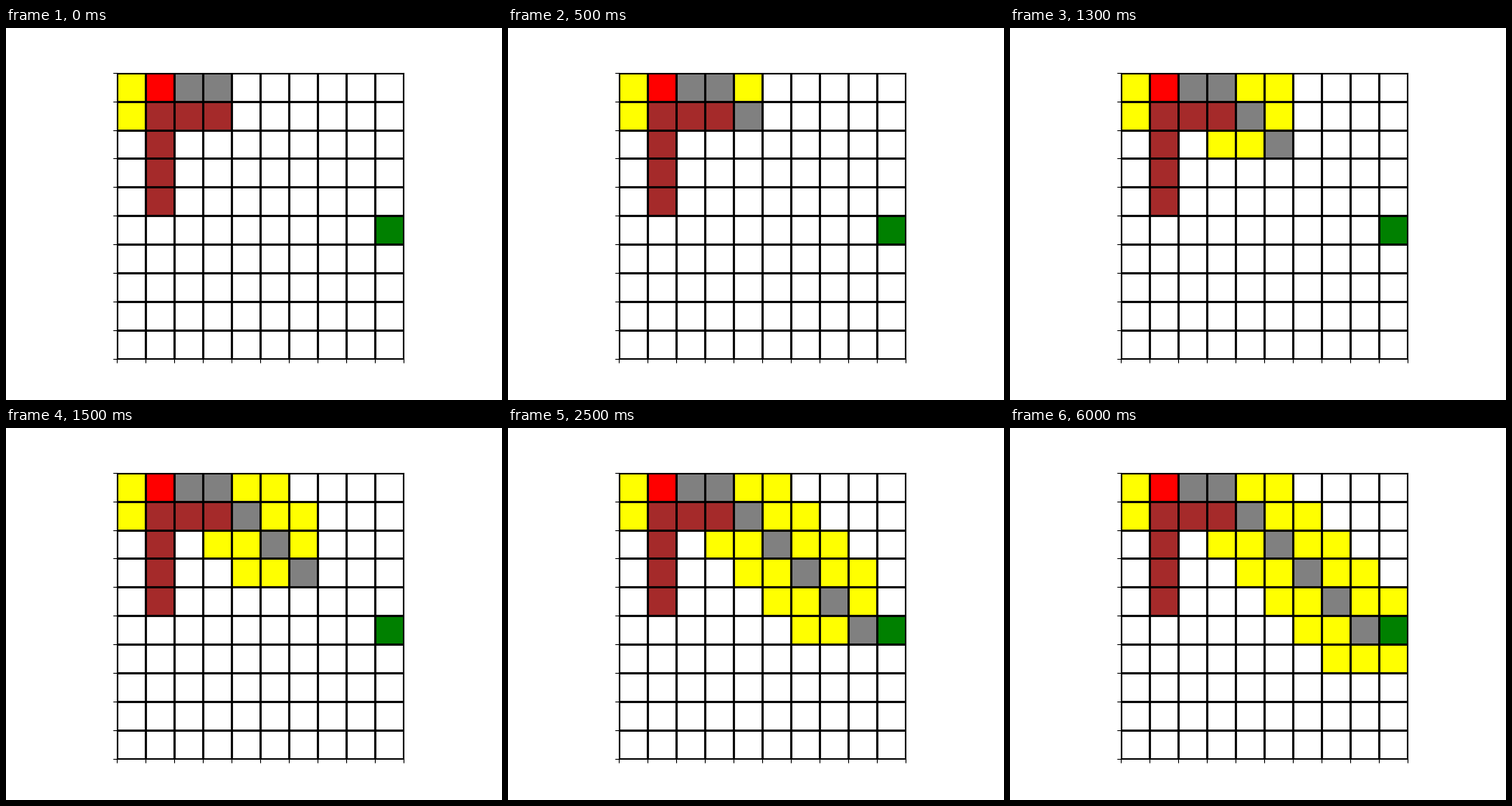
Animation of 640 by 480 pixels, one loop 8000 ms. Source, as a matplotlib script:

```python
import itertools
import math

import matplotlib.pyplot as plt
import numpy as np
from matplotlib.animation import FuncAnimation
from matplotlib.colors import ListedColormap

SIZE = 10
STEP_MS = 500
FRAMES = 16
EMPTY, WALL, SEEN, PATH, START, GOAL = range(6)
COLORS = ListedColormap(["white", "brown", "yellow", "gray", "red", "green"])

start, goal = (0, 1), (5, 9)
walls = [(1, 1), (2, 1), (3, 1), (4, 1), (1, 2), (1, 3)]


def expand(grid, cell):
    """Mark the open neighbours of a cell and step to the one nearest the goal."""
    options = []
    for dr, dc in itertools.product((-1, 0, 1), repeat=2):
        r, c = cell[0] + dr, cell[1] + dc
        if not (0 <= r < SIZE and 0 <= c < SIZE):
            continue
        if grid[r, c] == EMPTY:
            grid[r, c] = SEEN
        if grid[r, c] in (SEEN, GOAL):
            options.append((r, c))
    best = min(options, key=lambda p: math.dist(p, goal))
    if best != goal:
        grid[best] = PATH
    return best


def search():
    """Grid after every step of a greedy best-first search."""
    grid = np.full((SIZE, SIZE), EMPTY)
    for wall in walls:
        grid[wall] = WALL
    grid[start], grid[goal] = START, GOAL
    cell, states = start, []
    while cell != goal:
        cell = expand(grid, cell)
        states.append(grid.copy())
    return states


states = search()[1:]

fig, ax = plt.subplots(figsize=(6.4, 4.8), dpi=100)
image = ax.imshow(states[0], cmap=COLORS, vmin=EMPTY, vmax=GOAL)
edges = np.arange(-0.5, SIZE, 1)
ax.set_xticks(edges, labels=[])
ax.set_yticks(edges, labels=[])
ax.grid(color="black", linestyle="-", linewidth=2)


def update(frame):
    image.set_data(states[min(frame, len(states) - 1)])
    return [image]


anim = FuncAnimation(fig, update, frames=FRAMES, interval=STEP_MS,
                     repeat=True, repeat_delay=0)
plt.show()
```
